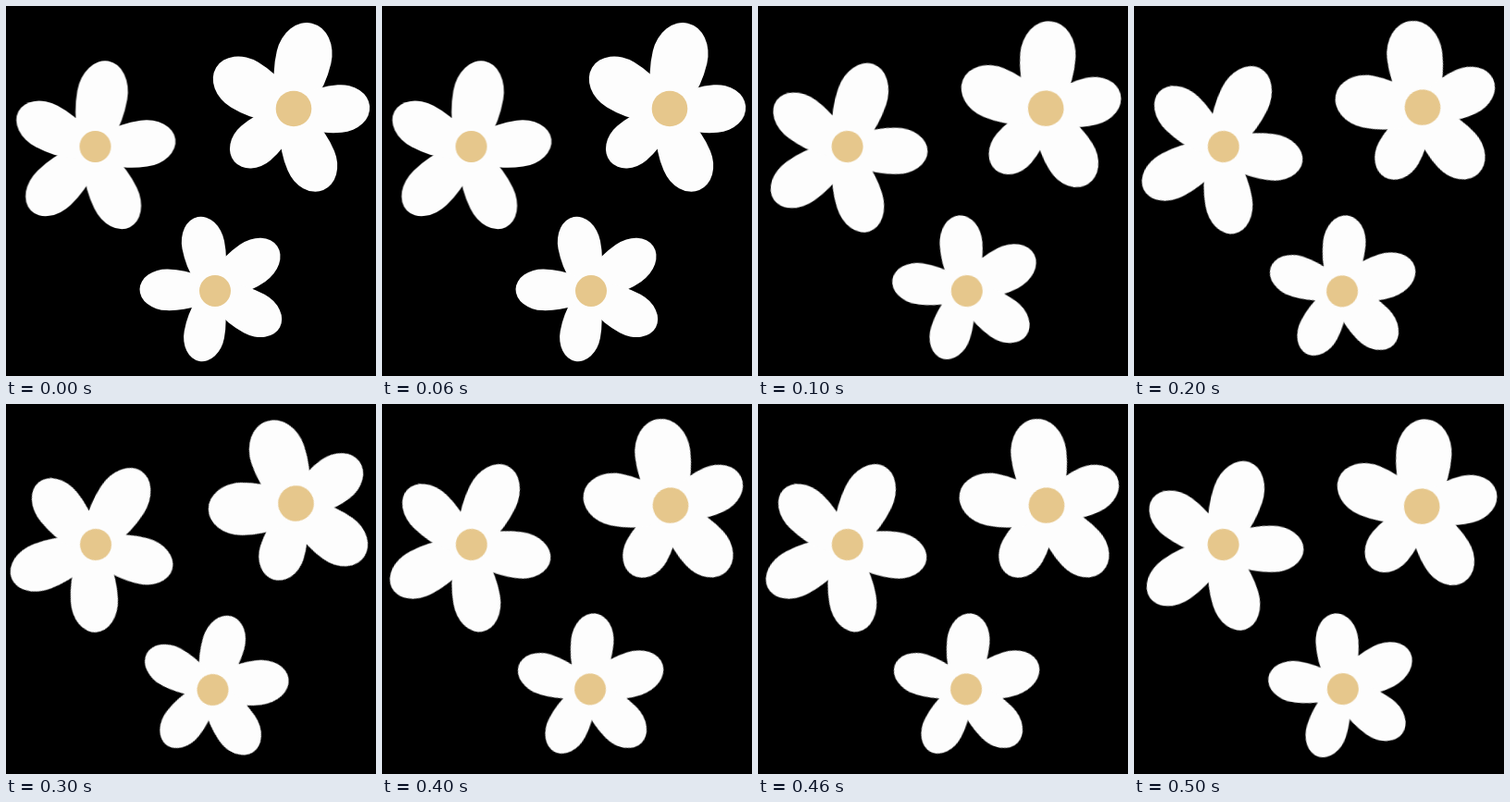
Write an HTML page that moves like this. It is 400x400 px and loops after 600 ms.

```html
<!DOCTYPE html>
<html lang="en">
<head>
<meta charset="utf-8">
<title>Swaying daisies</title>
<style>
  html, body { margin: 0; width: 100%; height: 100%; overflow: hidden; background: #000; }
  svg { display: block; width: 100%; height: 100%; }
  .petal { fill: #fdfdfd; }
  .heart { fill: #e6c78c; }
</style>
</head>
<body>
<svg id="stage" viewBox="0 0 400 400"></svg>
<script>
  const LOOP = 600;
  const STEPS = 6;
  const WIDEST = 0.62;   // where along its length a petal is widest

  // hub: point the petals grow from, relative to the heart
  // lean: heading of the first petal; skew: uneven spacing, in degrees
  // swing: full turn; ease: exponent of the swing; drift: shift at full swing
  const flowers = [
    {
      x: 96.5, y: 152, heart: 17, hub: [-3, 4.5], lean: 10, skew: 0,
      lengths: [98.5, 90.5, 92, 92.7, 90.7], fat: 0.278,
      swing: 23, ease: 0.88, drift: [0.5, 0]
    },
    {
      x: 311, y: 111, heart: 19.3, hub: [-3, 4.5], lean: 13.2, skew: 0,
      lengths: [99.5, 85.5, 90.5, 80.7, 94.5], fat: 0.302,
      swing: -31.7, ease: 1.14, drift: [2.5, -3.5]
    },
    {
      x: 226, y: 308, heart: 17, hub: [-3, 0], lean: -19.1, skew: 8,
      lengths: [81.5, 85.3, 83, 77.3, 78.5], fat: 0.284,
      swing: 27.6, ease: 1.2, drift: [-2.5, 1]
    }
  ];

  function add(parent, tag, attrs) {
    const el = document.createElementNS("http://www.w3.org/2000/svg", tag);
    for (const key in attrs) el.setAttribute(key, attrs[key]);
    return parent.appendChild(el);
  }

  // Egg shape: a short outer half and a longer inner half.
  function addPetal(parent, heading, length, half, hub) {
    const wide = length * WIDEST;
    const d = `M${-half} ${-wide}` +
      `A${half} ${length - wide} 0 0 1 ${half} ${-wide}` +
      `A${half} ${wide} 0 0 1 ${-half} ${-wide}Z`;
    add(parent, "path", { class: "petal", d, transform: `translate(${hub}) rotate(${heading})` });
  }

  // Swing out for half the loop, then back the same way.
  function pose(f, step) {
    const half = STEPS / 2;
    const p = (1 - Math.abs(step / half - 1)) ** f.ease;
    const x = f.x + f.drift[0] * p * p;
    const y = f.y + f.drift[1] * p * p;
    return `translate(${x}px, ${y}px) rotate(${f.swing * p}deg)`;
  }

  const stage = document.getElementById("stage");

  for (const f of flowers) {
    const g = add(stage, "g", {});
    f.lengths.forEach((length, i) => {
      const turn = 360 * i / f.lengths.length;
      const heading = f.lean + turn + f.skew * Math.cos(turn * Math.PI / 180);
      addPetal(g, heading, length, length * f.fat, f.hub);
    });
    add(g, "circle", { class: "heart", r: f.heart });

    const frames = Array.from({ length: STEPS + 1 }, (_, i) => ({
      offset: i / STEPS,
      transform: pose(f, i),
      easing: "steps(1, end)"
    }));
    g.animate(frames, { duration: LOOP, iterations: Infinity }).startTime = 0;
  }
</script>
</body>
</html>
```
